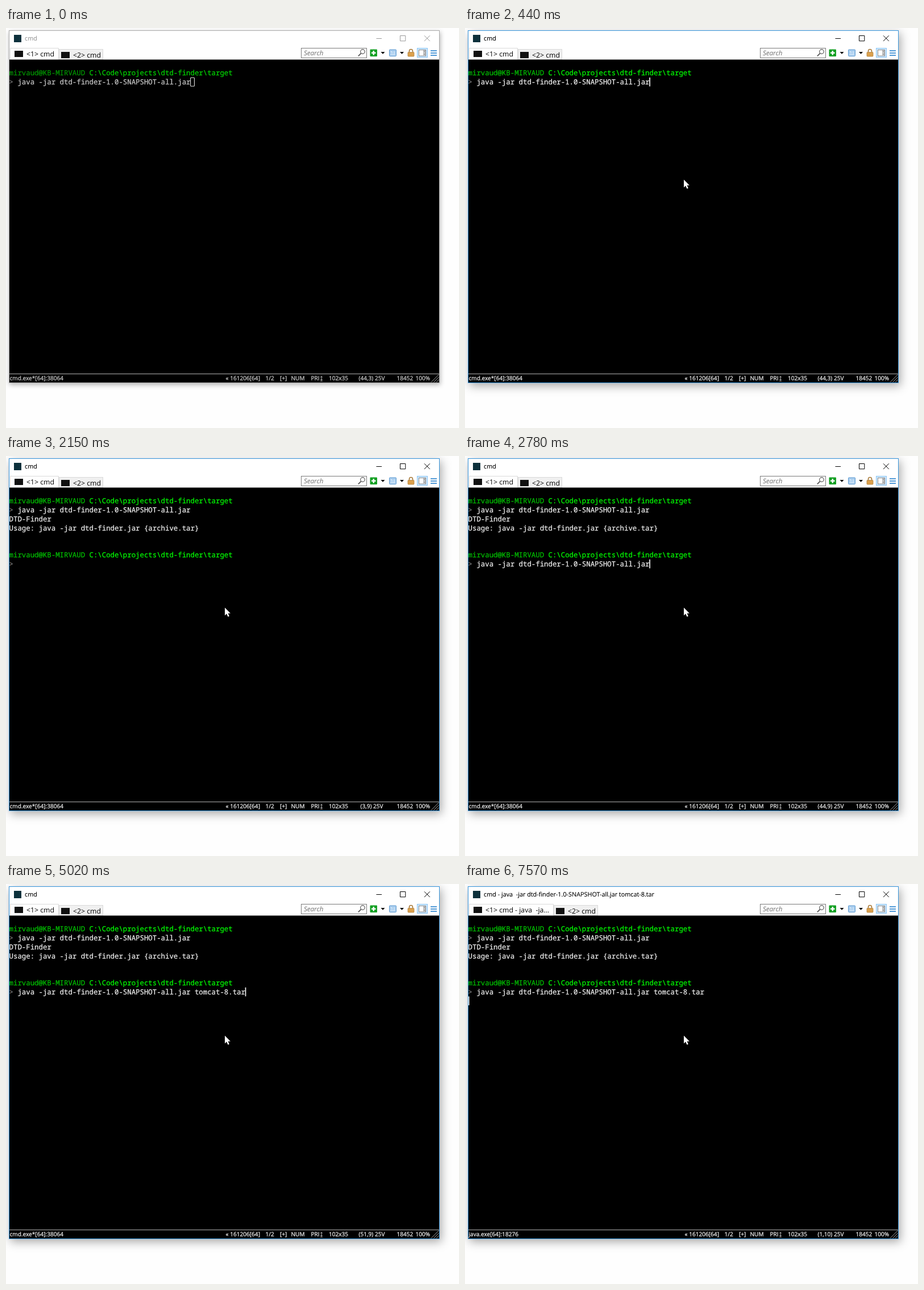
An HTML page for the animation above (8 s loop, 797x703 px).

```html
<!DOCTYPE html>
<html lang="en">
<head>
<meta charset="utf-8">
<title>Terminal session</title>
<style>
  html, body { margin: 0; width: 100%; height: 100%; overflow: hidden; background: #fefefe; }
  svg { position: absolute; left: 0; top: 0; display: block; }
  text { white-space: pre; text-rendering: geometricPrecision; font-family: "Open Sans", "Noto Sans", "DejaVu Sans", sans-serif; }

  #frame { position: absolute; left: 5px; top: 4px; width: 756px; height: 618px; background: #fff;
           border: 1px solid #3594db; box-shadow: 3px 5px 16px rgba(0, 0, 0, .34); }
  .idle #frame { border-color: #aaa; box-shadow: 1px 3px 8px rgba(0, 0, 0, .3); }

  #title { font-size: 10.82px; stroke: #000; stroke-width: .12; }
  #controls { stroke: #000; fill: none; }
  .idle #title { fill: #999; stroke: #999; }
  .idle #controls { stroke: #999; }

  .tab { font-size: 12.25px; }
  #search { font-size: 11.6px; font-style: italic; fill: #6d6d6d; }

  #screen text { font: 12.36px "Noto Sans Mono", "DejaVu Sans Mono", monospace; stroke-width: .28; --ink: #ececec; }
  #screen .user { --ink: #00bc00; }
  #screen .path { --ink: #00fa00; }
  #screen .mark { --ink: #7c7c7c; }
  .idle #screen text { --ink: #c4c4c4; }
  .idle #screen .user { --ink: #009400; }
  .idle #screen .path { --ink: #00d200; }

  #status text { font-size: 10.1px; stroke-width: .25; --ink: #f2f2f2; }
  .idle #status text { --ink: #d0d0d0; }
  #screen text, #screen tspan, #status text { fill: var(--ink); stroke: var(--ink); }
</style>
</head>
<body>
<div id="frame"></div>
<svg width="797" height="703" viewBox="0 0 797 703">
  <!-- title bar -->
  <rect x="14" y="12" width="13" height="13" fill="#0d313c"/>
  <text id="title" x="33" y="22"></text>
  <g id="controls">
    <path d="M651.5 18.5h9.5M693.5 13.5h9.3v9.3h-9.3z"/>
    <path d="M736 13.3l9.8 9.8M745.8 13.3l-9.8 9.8"/>
  </g>

  <!-- tabs -->
  <path id="tab1" fill="#fff" stroke="#d9d9d9"/>
  <rect x="15" y="40" width="15" height="11" fill="#111"/>
  <text id="label1" class="tab" x="36" y="50"></text>
  <g id="tab2">
    <rect x=".5" y="37.5" width="77" height="18" fill="#f0f0f0" stroke="#d9d9d9"/>
    <rect x="4" y="42" width="15" height="11" fill="#111"/>
    <text class="tab" x="25" y="52">&lt;2&gt; cmd</text>
  </g>

  <!-- toolbar -->
  <rect x="519.5" y="35.5" width="115" height="17" fill="#fff" stroke="#7a7a7a"/>
  <text id="search" x="524" y="48">Search</text>
  <g fill="none" stroke="#555" stroke-width="1.2">
    <circle cx="627.5" cy="41.5" r="3.8"/>
    <path d="M624.8 44.4l-5 5" stroke-width="1.8"/>
  </g>
  <rect x="640.5" y="37.5" width="12.5" height="12.5" rx="1" fill="#15a024"/>
  <path d="M646.75 40v7.5M643 43.75h7.5" stroke="#fff" stroke-width="2.4"/>
  <path d="M659.5 42h7l-3.5 3.8zM693 42h7l-3.5 3.8z"/>
  <rect x="674.5" y="38" width="12" height="11.5" rx="1" fill="#a9cdee" stroke="#5f9bd1"/>
  <path d="M677 41.5h2v4M683 41v5M676.5 47h8" fill="none" stroke="#e4f1fc"/>
  <path d="M709.5 43v-2.5a3 3 0 0 1 6 0v2.5" fill="none" stroke="#a87b3b" stroke-width="1.6"/>
  <rect x="707" y="42.5" width="11" height="7.5" rx="1" fill="#dba04c" stroke="#a87b3b" stroke-width=".7"/>
  <rect x="723.5" y="35.5" width="18" height="16" fill="#cce8ff" stroke="#8cc4f2"/>
  <rect x="726.5" y="38.5" width="12" height="10.5" fill="#fff" stroke="#8a8a8a"/>
  <path d="M734 39h4v9.5h-4z" fill="#c3c3c3"/>
  <path d="M736 40.5v1.5M736 45.5v1.5" stroke="#666"/>
  <path d="M747 40h11M747 44h11M747 48h11" stroke="#1979ca" stroke-width="1.7"/>

  <!-- terminal -->
  <rect x="6" y="55.5" width="756" height="567.5"/>
  <g id="screen"></g>
  <rect id="bar" width="1.7" height="15.6" fill="#f2f2f2"/>
  <rect id="box" width="6.8" height="15" rx="1" fill="none" stroke="#e0e0e0" stroke-width="1.1"/>

  <!-- status bar -->
  <path d="M6 607.9h756" stroke="#bdbdbd"/>
  <g id="status">
    <text id="proc" x="6.5" y="619.3"></text>
    <text x="386.5" y="619.3">« 161206[64]</text>
    <text x="456.5" y="619.3">1/2</text>
    <text x="482" y="619.3">[+]</text>
    <text x="501.5" y="619.3">NUM</text>
    <text x="536.5" y="619.3">PRI</text>
    <path d="M555 612.5v6M553.3 614l1.7-2 1.7 2M553.3 617l1.7 2 1.7-2M553 620.3h4" fill="none" stroke="#ccc" stroke-width=".9"/>
    <text x="585" y="619.3" text-anchor="middle">102x35</text>
    <text id="pos" x="643.5" y="619.3" text-anchor="middle"></text>
    <text x="687.5" y="619.3">18452</text>
    <text x="720.5" y="619.3">100%</text>
    <path d="M748 622.5l13.5-13.5M752.5 622.5l9-9M757 622.5l4.5-4.5" stroke="#a6a6a6"/>
  </g>

  <!-- pointer -->
  <g id="mouse">
    <circle id="halo" cx="-1" cy="-1" r="11" fill="#ff0" fill-opacity=".47"/>
    <path d="M0 .4V14.2L3.2 11.3 5.5 16.5 7.8 15.5 5.6 10.5H9.9Z" fill="#fff" stroke="#000" stroke-width=".8" paint-order="stroke"/>
  </g>
</svg>
<script>
const LOOP = 8000;
const COL = 7.415, ROW = 15.8, LEFT = 5.6, TOP = 55.4;
const SHELL = 'cmd.exe*[64]:38064';
const RUN = 'java -jar dtd-finder-1.0-SNAPSHOT-all.jar';
const TITLE = 'cmd - java  -jar dtd-finder-1.0-SNAPSHOT-all.jar';
const $ = id => document.getElementById(id);

// caret = [column, row]; output: 0 none, 1 usage text, 2 second prompt as well
const typed = arg => ({ input: RUN + arg, caret: [2 + RUN.length + arg.length, 8], on: true });
const steps = [
  [0, { active: false, mouse: null, click: false, title: 'cmd', proc: SHELL, pos: '44,3',
        output: 0, input: '', caret: [43, 2], on: true }],
  [70, { mouse: [440, 390] }],
  [140, { mouse: [396, 292] }],
  [210, { mouse: [386, 266] }],
  [290, { mouse: [385, 266], active: true, click: true }],
  [440, { click: false }],
  [840, { on: false }],
  [1220, { caret: [0, 3], on: true, pos: '1,4' }],
  [1310, { title: TITLE, proc: 'java.exe[64]:45780' }],
  [1620, { output: 1, caret: [0, 5] }],
  [1690, { output: 2, title: 'cmd', caret: [2, 8] }],
  [1860, { proc: SHELL, pos: '3,9' }],
  [2150, { on: false }],
  [2700, typed('')],
  [2780, { pos: '44,9' }],
  [3240, { on: false }],
  [3550, { ...typed(' '), pos: '45,9' }],
  [3850, typed(' t')],
  [4100, typed(' tom')],
  [4170, { ...typed(' tomc'), pos: '48,9' }],
  [4400, typed(' tomca')],
  [4480, typed(' tomcat')],
  [4940, typed(' tomcat-8.tar')],
  [5020, { pos: '51,9' }],
  [5400, { pos: '57,9' }],
  [5480, { on: false }],
  [6100, { on: true }],
  [6490, { title: TITLE + ' tomcat-8.tar', caret: [0, 9], on: true, pos: '1,10' }],
  [6790, { proc: 'java.exe[64]:18276' }],
  [7040, { on: false }],
  [7570, { on: true }]
];

function line(row, html) {
  const el = document.createElementNS('http://www.w3.org/2000/svg', 'text');
  el.setAttribute('x', LEFT);
  el.setAttribute('y', TOP + ROW * row + 11.9);
  el.innerHTML = html;
  $('screen').append(el);
  return el;
}

const prompt = '<tspan class="user">mirvaud@KB-MIRVAUD</tspan> <tspan class="path">C:\\Code\\projects\\dtd-finder\\target</tspan>';
const command = text => `<tspan class="mark">&gt;</tspan> <tspan>${text}</tspan>`;
line(1, prompt);
line(2, command(RUN));
const usage = [line(3, 'DTD-Finder'), line(4, 'Usage: java -jar dtd-finder.jar {archive.tar}')];
const second = [line(7, prompt), line(8, command(''))];
const input = second[1].lastChild;

const show = (el, on) => el.setAttribute('visibility', on ? 'visible' : 'hidden');
const move = (el, x, y) => el.setAttribute('transform', `translate(${x} ${y})`);

function draw(count) {
  const s = Object.assign({}, ...steps.slice(0, count).map(step => step[1]));
  const busy = s.title !== 'cmd';
  const edge = busy ? 155.5 : 92.5;
  document.body.classList.toggle('idle', !s.active);

  $('title').textContent = s.title;
  $('label1').textContent = busy ? '<1> cmd - java  -ja...' : '<1> cmd';
  $('tab1').setAttribute('d', `M7.5 55V35.5H${edge}V55`);
  move($('tab2'), edge + .5, 0);

  usage.forEach(el => show(el, s.output > 0));
  second.forEach(el => show(el, s.output > 1));
  input.textContent = s.input;

  const [col, row] = s.caret;
  const x = LEFT + COL * col, y = TOP + ROW * row;
  move($('bar'), Math.max(x - .2, 5.9), y);
  move($('box'), x + .2, y + .3);
  show($('bar'), s.active && s.on);
  show($('box'), !s.active);

  $('proc').textContent = s.proc;
  $('pos').textContent = `(${s.pos}) 25V`;
  show($('mouse'), s.mouse);
  show($('halo'), s.mouse && s.click);
  if (s.mouse) move($('mouse'), ...s.mouse);
}

const start = performance.now();
let shown = 0;
function tick() {
  const t = (performance.now() - start) % LOOP;
  const count = steps.filter(([at]) => at <= t).length;
  if (count !== shown) draw(shown = count);
  requestAnimationFrame(tick);
}
tick();
</script>
</body>
</html>
```
